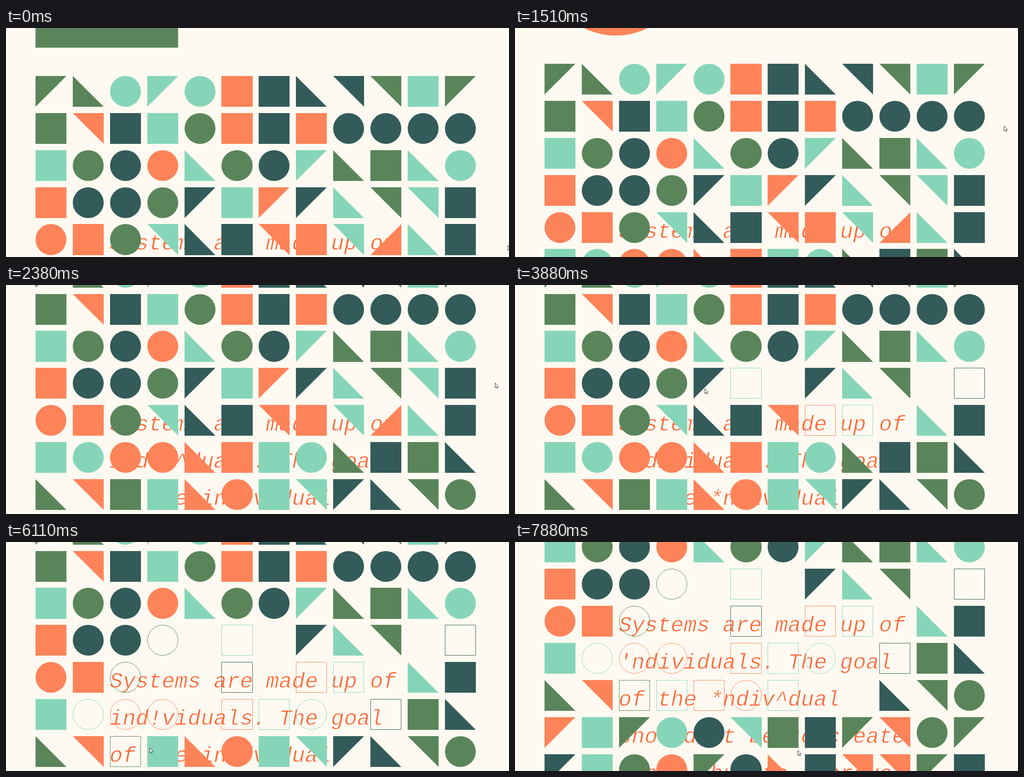
Animation of 1107 by 506 pixels, one loop 8 s. Source, as an HTML page with a canvas:

```html
<!DOCTYPE html>
<html lang="en">
<head>
<meta charset="utf-8">
<title>Shape grid</title>
<style>
  html, body { margin: 0; height: 100%; overflow: hidden; background: #fffaf1; }
  canvas { display: block; }
</style>
</head>
<body>
<canvas id="stage" width="1107" height="506"></canvas>
<script>
const ctx = document.getElementById('stage').getContext('2d');
const LOOP = 8000, TICK = 125; // the motion advances at eight poses a second
const LEFT = 64.9, TOP = 105.8, PITCH = 81.9, SIZE = 68.1;
const PAPER = '#fffaf1';
const COLORS = { g: '#5a855a', o: '#ff8359', m: '#86d5b9', d: '#325b59' };

// Each cell is a colour and a shape: s = square, c = circle,
// w x y z = triangle with its right angle top left, top right, bottom right, bottom left.
// A trailing + marks a triangle that opens into a square frame.
const cells = `
  gw gz mc mw mc os ds dz dx gx ms gw
  gs ox ds ms gc os ds os dc dc dc dc
  ms gc dc oc mz gc dc mw gz gs mz mc
  os dc dc gc dw ms ow dw mz gx mx ds
  oc os gc mx dz ds ox os mx+ oy mz ds
  ms mc oc oc oz os ms mc gz ds gs dz
  gz ox gs ms oz+ oc ms mx dw dz gx gc
  ow ms gw mc dc mx gs ds gw ox gc gw
  dw ms gc oc gw dc oz ds ox ox gw ds
`.trim().split(/\s+/).map(([color, shape, frame], i) => ({
  x: LEFT + i % 12 * PITCH,
  y: TOP + Math.floor(i / 12) * PITCH,
  color: COLORS[color],
  shape,
  corner: 'wxyz'.indexOf(shape),
  framed: frame === '+',
  openAt: Infinity
}));

// Key points in ticks: [tick, scroll] and [tick, x, y]
const scrollPath = [[9.4, 0], [12, 26.8], [15, 92.8], [19, 168.2], [60.5, 168.2], [63, 292.5]];
const cursorPath = [
  [0.5, 1104, 480], [5, 1076, 216], [21.5, 1076, 216], [24, 895, 222], [25, 828, 308],
  [28, 548, 226], [29.5, 548, 226], [32, 330, 230], [33, 262, 300], [39, 875, 322],
  [40, 838, 385], [42, 585, 373], [45, 200, 368], [46.5, 200, 368], [48.5, 270, 460],
  [52, 590, 420], [54, 745, 440], [56, 489, 402], [57, 489, 402], [60, 622, 460]
];

// Each # is an "i" that turns into its symbol for part of a repeating cycle.
const text = [
  'Systems are made up of',
  '#nd#v#duals. The goal',
  'of the #nd#v#dual',
  "shouldn't be to create",
  'chaos, but to improve'
];
const flickers = [["'", 9], ['!', 0], ['^', 2], ['*', 9], ['/', 1], ['^', 15]];

const mix = (a, b, u) => a + (b - a) * u;
const clamp = u => Math.min(1, Math.max(0, u));

function along(path, tick) {
  const next = Math.max(1, path.findIndex(p => p[0] > tick));
  const [a, b] = tick < path.at(-1)[0] ? [path[next - 1], path[next]] : path.slice(-2);
  const u = clamp((tick - a[0]) / (b[0] - a[0]));
  return a.slice(1).map((v, i) => mix(v, b[i + 1], u));
}

// A cell opens shortly after the pointer first enters it.
for (let tick = 21; tick < 60; tick += 0.04) {
  const [x, y] = along(cursorPath, tick), [scroll] = along(scrollPath, tick);
  for (const cell of cells) {
    const dx = x - cell.x, dy = y + scroll - cell.y;
    const inside = Math.min(dx, dy) >= 0 && Math.max(dx, dy) <= SIZE;
    if (inside) cell.openAt = Math.min(cell.openAt, tick + 0.8);
  }
}

function drawCell(cell, tick, scroll) {
  const open = tick >= cell.openAt, triangle = cell.corner >= 0;
  if (open && triangle && !cell.framed) return;
  const inset = open ? 0.5 : 0;
  const left = Math.round(cell.x) + inset, right = Math.round(cell.x + SIZE) - inset;
  const top = Math.round(cell.y - scroll) + inset, bottom = Math.round(cell.y - scroll + SIZE) - inset;
  ctx.beginPath();
  if (cell.shape === 'c') {
    ctx.ellipse((left + right) / 2, (top + bottom) / 2, (right - left) / 2, (bottom - top) / 2, 0, 0, 7);
  } else if (triangle && !open) {
    const corners = [[left, top], [right, top], [right, bottom], [left, bottom]];
    for (const step of [3, 0, 1]) ctx.lineTo(...corners[(cell.corner + step) % 4]);
  } else {
    ctx.rect(left, top, right - left, bottom - top);
  }
  ctx.fillStyle = ctx.strokeStyle = cell.color;
  ctx.lineWidth = 1;
  open ? ctx.stroke() : ctx.fill();
}

// The large tile above the grid turns from a green square into an orange circle.
function drawBigTile(tick, scroll) {
  const size = 313.9, u = clamp((tick - 0.5) / 4.5);
  const rgb = [[90, 255], [133, 131], [90, 89]].map(([a, b]) => mix(a, b, u));
  ctx.fillStyle = `rgb(${rgb})`;
  ctx.beginPath();
  ctx.roundRect(LEFT, TOP - 62.3 - size - scroll, size, size, u * size / 2);
  ctx.fill();
}

function drawText(tick, scroll) {
  ctx.font = 'italic 47.78px "Liberation Mono", monospace';
  ctx.fillStyle = '#ff6433';
  ctx.strokeStyle = PAPER;
  ctx.lineWidth = 0.9;
  let slot = 0;
  text.forEach((line, i) => {
    const shown = line.replace(/#/g, () => {
      const [symbol, begin] = flickers[slot++];
      return (tick + 16 - begin) % 16 < 7 ? symbol : 'i';
    });
    const y = TOP + (i + 4) * PITCH + 57 - scroll;
    ctx.fillText(shown, 228, y);
    ctx.strokeText(shown, 228, y); // trims the letters to a lighter weight
  });
}

function drawCursor([x, y]) {
  ctx.beginPath();
  for (const [dx, dy] of [[0, 0], [0, 11], [2.5, 8.7], [4.2, 12.2], [5.7, 11.5], [4, 8.2], [7.3, 8]]) {
    ctx.lineTo(x + dx + 0.5, y + dy + 0.5);
  }
  ctx.closePath();
  ctx.fillStyle = '#fff';
  ctx.strokeStyle = '#222';
  ctx.lineWidth = 0.9;
  ctx.fill();
  ctx.stroke();
}

function draw(now) {
  const tick = Math.floor((now % LOOP + 20) / TICK) % (LOOP / TICK);
  const [scroll] = along(scrollPath, tick);
  ctx.fillStyle = PAPER;
  ctx.fillRect(0, 0, 1107, 506);
  drawBigTile(tick, scroll);
  drawText(tick, scroll);
  for (const cell of cells) drawCell(cell, tick, scroll);
  drawCursor(along(cursorPath, tick));
  requestAnimationFrame(() => draw(performance.now() - start));
}

const start = performance.now();
draw(0);
</script>
</body>
</html>
```
